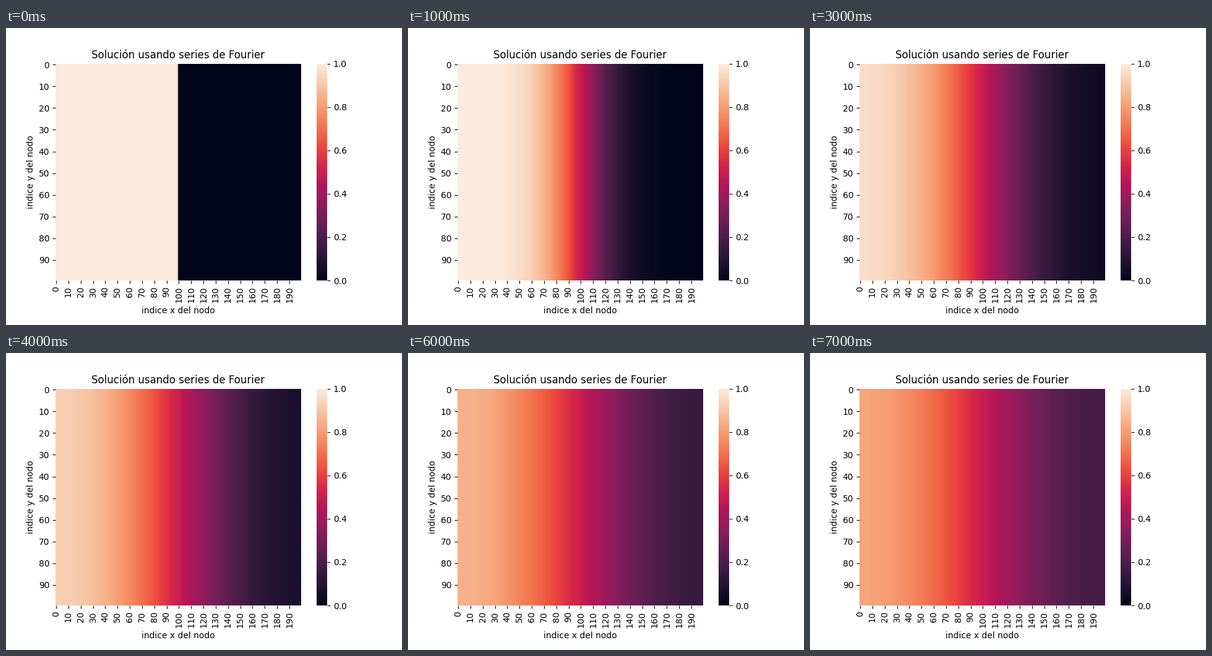
Write a matplotlib script that moves like this. It is 640 px wide and 480 px high and loops after 8 s.

```python
import numpy as np
import matplotlib.pyplot as plt
from matplotlib.animation import FuncAnimation
from matplotlib.colors import LinearSegmentedColormap

NX, NY = 200, 100
TERMS = 200
STEPS = 8
DT = 0.01  # dimensionless diffusion time per step

# Dark violet to cream ramp, given as evenly spaced samples
ends = ["#03051a", "#221331", "#451c47", "#6a1f56", "#921c5b", "#b91657",
        "#d92847", "#ed513e", "#f47c56", "#f6a47b", "#f7c9aa", "#faebdd"]
sevenths = ["#35193e", "#701f57", "#ad1759", "#e13342", "#f37651", "#f6b48f"]
fifths = ["#4c1d4b", "#a11a5b", "#e83f3f", "#f69c73"]
stops = [(k / 11, c) for k, c in enumerate(ends)]
stops += [((k + 1) / 7, c) for k, c in enumerate(sevenths)]
stops += [((k + 1) / 5, c) for k, c in enumerate(fifths)]
cmap = LinearSegmentedColormap.from_list("ember", sorted(stops), N=256)

x = np.linspace(0, 1, NX)
n = np.arange(1, TERMS + 1)[:, None]
modes = 2 / (n * np.pi) * np.sin(n * np.pi / 2) * np.cos(n * np.pi * x)


def temperature(step):
    """Cosine series for a step profile between insulated ends."""
    decay = np.exp(-(n * np.pi) ** 2 * DT * step)
    row = 0.5 + (modes * decay).sum(axis=0)
    return np.tile(row, (NY, 1))


fig, ax = plt.subplots(figsize=(6.4, 4.8), dpi=100)
fig.subplots_adjust(left=0.125, right=0.9, bottom=0.15, top=0.88)
mesh = ax.pcolormesh(temperature(0), cmap=cmap, vmin=0, vmax=1)
ax.set(xlim=(0, NX), ylim=(NY, 0))
ax.spines[:].set_visible(False)

bar = fig.colorbar(mesh, ax=ax)
bar.outline.set_linewidth(0)

xt, yt = np.arange(0, NX, 10), np.arange(0, NY, 10)
ax.set_xticks(xt + 0.5, xt, rotation="vertical")
ax.set_yticks(yt + 0.5, yt)
ax.set_title("Solución usando series de Fourier")
ax.set_xlabel("indice x del nodo")
ax.set_ylabel("indice y del nodo")


def update(step):
    mesh.set_array(temperature(step))
    return [mesh]


anim = FuncAnimation(fig, update, frames=STEPS, interval=1000,
                     repeat=True, repeat_delay=0, blit=False)
plt.show()
```
